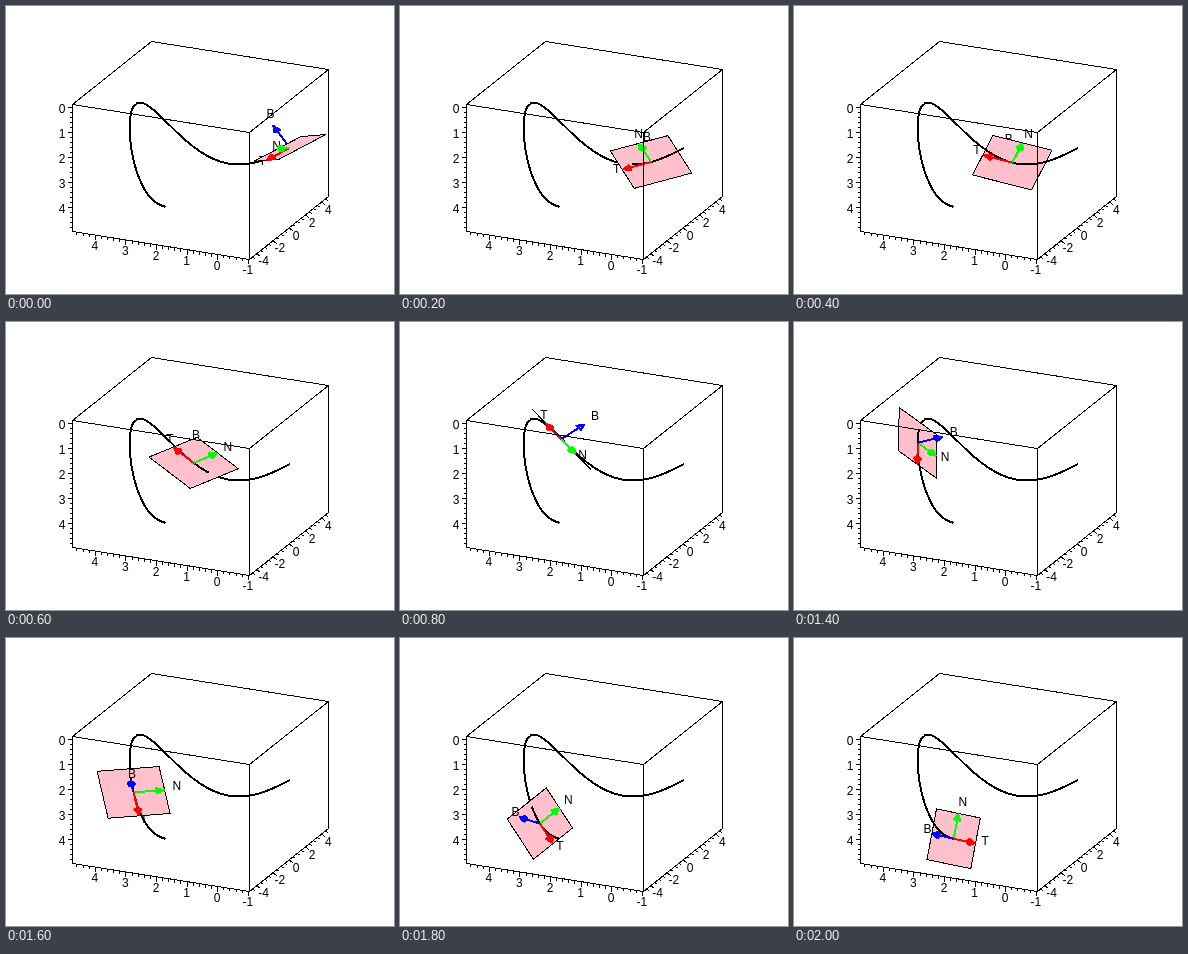
Recreate the animation shown at these times as an HTML page. Size 388 px wide and 288 px high, loop 2100 ms.

```html
<!DOCTYPE html>
<html lang="en">
<head>
<meta charset="utf-8">
<title>Moving frame on a space curve</title>
<style>
  html, body { margin: 0; width: 100%; height: 100%; overflow: hidden; background: #fff; }
  svg { display: block; width: 388px; height: 288px; }
  path { fill: none; stroke: #000; shape-rendering: crispEdges; }
  text { font: 12px "Liberation Sans", Arial, sans-serif; text-anchor: middle; }
  .curve { stroke-width: 2; }
  .plane { fill: #ffc0cb; }
</style>
</head>
<body>
<svg viewBox="0 0 388 288">
  <g transform="translate(.5 .5)">
    <g id="scene"></g>
    <path d="M66 98L145 35L322 63V190L243 253L66 225ZL243 126L322 63M243 126V253"/>
    <path id="ticks"/>
  </g>
  <g id="labels"></g>
</svg>
<script>
const FRAMES = 21, STEP = 100, T_END = 2.6, R = 4.03;
const VIEW = [-0.265, -1, -0.31]; // towards the viewer

const add = (p, q, k = 1) => p.map((c, i) => c + k * q[i]);
const dot = (p, q) => p[0] * q[0] + p[1] * q[1] + p[2] * q[2];
const unit = p => p.map(c => c / Math.sqrt(dot(p, p)));
const cross = (p, q) => [0, 1, 2].map(i => {
  const j = (i + 1) % 3, k = (i + 2) % 3;
  return p[j] * q[k] - p[k] * q[j];
});
const project = ([x, y, z]) =>
  [250.7 - 30.6 * x + 8.1 * y, 92.5 - 4.84 * x - 6.46 * y + 25 * z];
const trace = pts => 'M' + pts.map(p => project(p).map(c => c.toFixed(2)).join(' ')).join('L');
const text = (x, y, s) => `<text x="${x.toFixed(1)}" y="${(y + 4.5).toFixed(1)}">${s}</text>`;

// Position, velocity and acceleration along the curve
function curveAt(t) {
  const s = R * Math.sin(t), c = R * Math.cos(t);
  const w = 2.964, a = w * t + 0.26, e = 0.21 * Math.exp(-3 * t);
  return {
    pos: [s, c, 2.43 + 1.4 * Math.sin(a) + e],
    vel: [c, -s, 1.4 * w * Math.cos(a) - 3 * e],
    acc: [-s, -c, -1.4 * w * w * Math.sin(a) + 9 * e]
  };
}

const curve = Array.from({ length: 241 }, (_, i) => curveAt(T_END * i / 240).pos);

function arrow(base, dir, side, up, color) {
  const neck = add(base, dir, 0.72), tip = add(base, dir);
  const rim = Array.from({ length: 16 }, (_, i) => {
    const a = i * Math.PI / 8;
    return add(add(neck, side, 0.13 * Math.cos(a)), up, 0.13 * Math.sin(a));
  });
  const cone = rim.map((p, i) => trace([tip, p, rim[(i + 1) % 16]]) + 'Z').join('');
  const head = d => `<path d="${d}" style="fill:${color};stroke:${color};stroke-width:.6"/>`;
  return `<path d="${trace([base, neck])}" style="stroke:${color};stroke-width:2"/>` +
    head(trace(rim) + 'Z') + head(cone);
}

function drawFrame(n) {
  const { pos, vel, acc } = curveAt(T_END * n / (FRAMES - 1));
  const T = unit(vel), N = unit(add(acc, T, -dot(acc, T))), B = cross(T, N);
  const facing = Math.sign(dot(B, VIEW));

  // Split the curve by the side of the osculating plane it lies on
  let back = '', front = '';
  for (let i = 1; i < curve.length; i++) {
    const piece = trace([curve[i - 1], curve[i]]);
    if (dot(add(curve[i], pos, -1), B) * facing < -0.004) back += piece;
    else front += piece;
  }

  const label = (dir, s) => {
    const [x, y] = project(add(pos, dir, 1.3));
    return text(x + 3, y - 4, s);
  };
  const corners = [[1, 1], [-1, 1], [-1, -1], [1, -1]]
    .map(([u, v]) => add(add(pos, T, u), N, v));
  const line = d => `<path class="curve" d="${d}"/>`;
  const binormal = arrow(pos, B, T, N, '#00f') + label(B, 'B');
  const inPlane = [
    { dir: T, svg: arrow(pos, T, N, B, '#f00') },
    { dir: N, svg: arrow(pos, N, T, B, '#0f0') }
  ].sort((p, q) => dot(p.dir, VIEW) - dot(q.dir, VIEW));

  document.getElementById('scene').innerHTML =
    line(back) + label(T, 'T') + label(N, 'N') +
    (facing < 0 ? binormal : '') +
    `<path class="plane" d="${trace(corners)}Z"/>` +
    line(front) + inPlane.map(p => p.svg).join('') +
    (facing > 0 ? binormal : '');
}

function drawAxes() {
  let ticks = '', labels = '';
  // from..to in units of 1/sub; at(v) gives the point on the edge
  const axis = (from, to, sub, every, at, [tx, ty], [lx, ly]) => {
    for (let i = from; i <= to; i++) {
      const v = i / sub, [x, y] = at(v), major = v % every === 0;
      const k = major ? 5 : 3;
      ticks += `M${x} ${y}l${k * tx} ${k * ty}`;
      if (major) labels += text(x + lx, y + ly, v);
    }
  };
  axis(0, 24, 5, 1, v => [66, 101 + 25 * v], [-1, 0], [-10, 1]);
  axis(-5, 23, 5, 1, v => [211.2 - 30.6 * v, 248 - 4.84 * v], [0, 1], [0, 11]);
  axis(-9, 9, 2, 2, v => [282.5 + 8.1 * v, 221.5 - 6.46 * v], [0.8, 0.5], [7.5, 7.5]);
  document.getElementById('ticks').setAttribute('d', ticks);
  document.getElementById('labels').innerHTML = labels;
}

drawAxes();
const start = performance.now();
let shown = -1;
function tick() {
  const n = Math.floor((performance.now() - start) / STEP) % FRAMES;
  if (n !== shown) drawFrame(shown = n);
  requestAnimationFrame(tick);
}
tick();
</script>
</body>
</html>
```
